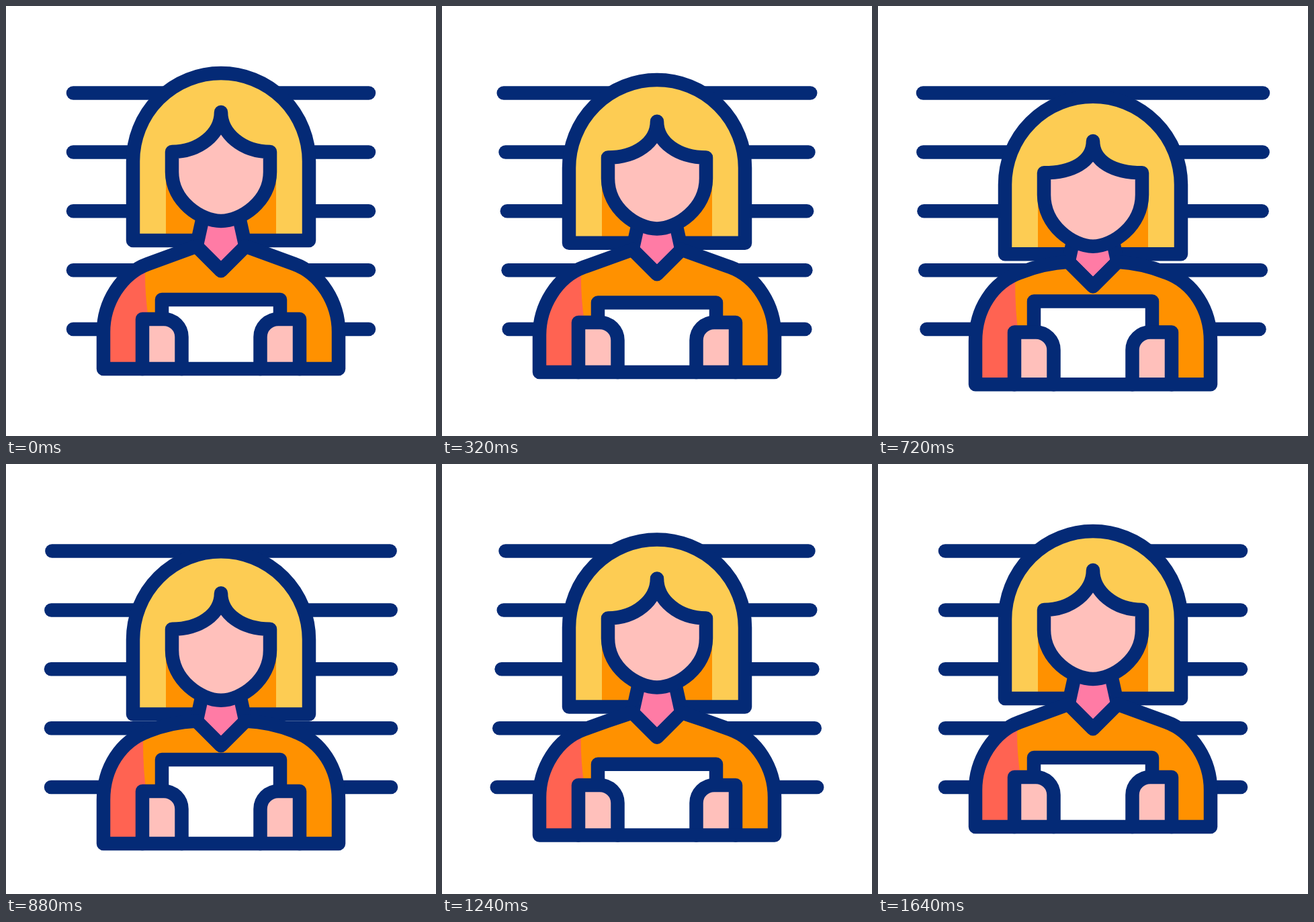
Animation, 640 px wide and 640 px high, one loop 1680 ms. Source, as an HTML page with a canvas:

```html
<!DOCTYPE html>
<html lang="en">
<head>
<meta charset="utf-8">
<title>Line-up</title>
<style>
  html, body { margin: 0; width: 100%; height: 100%; overflow: hidden; background: #fff; }
  canvas { display: block; width: 640px; height: 640px; }
</style>
</head>
<body>
<canvas id="stage"></canvas>
<script>
const LOOP = 1680, STEP = 40;
const NAVY = '#042a76', YELLOW = '#fdcc53', ORANGE = '#ff9100', RED = '#ff6352',
      SKIN = '#ffc0bb', PINK = '#ff7ba5';

const canvas = document.getElementById('stage');
const ctx = canvas.getContext('2d');
const dpr = window.devicePixelRatio || 1;
canvas.width = canvas.height = 640 * dpr;

// Smooth 0..1 ramp between two times
const ease = (t, from, to) => {
  const u = Math.min(1, Math.max(0, (t - from) / (to - from)));
  return (1 - Math.cos(Math.PI * u)) / 2;
};
// Rise, hold, fall
const pulse = (t, a, b, c, d) => ease(t, a, b) - ease(t, c, d);

function shape(d, fill, line = true) {
  const path = new Path2D(d);
  if (fill) { ctx.fillStyle = fill; ctx.fill(path); }
  if (line) ctx.stroke(path);
}

function wall(t) {
  for (let i = 0; i < 5; i++) {
    const grow = 33 * pulse(t - i * 40, 120, 720, 800, 1400);
    shape(`M${100 - grow},${129.5 + i * 87.9}H${540 + grow}`);
  }
}

function hair(nod) {
  const top = 231 + 12 * nod, bottom = 349 - 3.3 * nod;
  const d = `M189,${bottom}V${top}A131,131 0 0 1 451,${top}V${bottom}Z`;
  shape(d, YELLOW, false);
  ctx.fillStyle = ORANGE;
  ctx.fillRect(238, 250, 164, bottom - 250);
  shape(d);
}

function bodyPath(lift) {
  const y = (base, rise) => base - rise * lift;
  return `M145,540V${y(485, 10)}
    C145,${y(442, 15)} 171,${y(398.5, 11)} 211,${y(384, 11)}
    C235,${y(375.2, 11.7)} 259,${y(366.4, 8)} 283.5,357.5
    L320,394L356.5,357.5
    C381,${y(366.4, 8)} 405,${y(375.2, 11.7)} 429,${y(384, 11)}
    C469,${y(398.5, 11)} 495,${y(442, 15)} 495,${y(485, 10)}V540Z`;
}

function torso(lift) {
  const body = bodyPath(lift);
  shape(body, ORANGE, false);

  ctx.save();
  ctx.clip(new Path2D(body));
  const edge = 207 - 3 * lift;
  shape(`M130,350H${edge}V${399 - 11 * lift}Q${edge},430 ${edge + 5},466V540H130Z`, RED, false);
  ctx.restore();

  const paper = 437 - 22 * lift, hand = 466 - 4 * lift;
  ctx.fillStyle = '#fff';
  ctx.fillRect(232, paper, 176, 540 - paper);
  shape(`M232,${hand}V${paper}H408V${hand}`);

  for (const side of [1, -1]) {
    ctx.save();
    ctx.translate(320, 0);
    ctx.scale(side, 1);
    shape(`M-117,540V${hand}H-85A26.5,26.5 0 0 1 -58.5,${hand + 26.5}V540`, SKIN);
    ctx.restore();
  }

  shape('M294,310L283.5,357.5L320,394L356.5,357.5L346,310', PINK);
  shape(body);
}

function face(nod) {
  const part = 158 + 20.5 * nod, bend = 190 + 20 * nod, brow = 217 + 8.3 * nod,
        cheek = 247 + 11 * nod, jaw = 291 + 13 * nod, chin = 320 + 15 * nod;
  shape(`M320,${part}C320,${bend} 288,${brow} 247,${brow}V${cheek}
    C247,${jaw} 290,${chin} 320,${chin}
    C350,${chin} 393,${jaw} 393,${cheek}V${brow}
    C352,${brow} 320,${bend} 320,${part}Z`, SKIN);
}

function draw(t) {
  const sink = 25 * pulse(t, 100, 842, 878, 1600);
  const nod = 1.04 * pulse(t, 100, 600, 640, 1080);
  const lift = pulse(t, 260, 800, 898, 1343);

  ctx.setTransform(dpr, 0, 0, dpr, 0, 0);
  ctx.fillStyle = '#fff';
  ctx.fillRect(0, 0, 640, 640);
  ctx.strokeStyle = NAVY;
  ctx.lineWidth = 20.5;
  ctx.lineCap = ctx.lineJoin = 'round';

  wall(t);
  ctx.translate(0, sink);
  hair(nod);
  torso(lift);
  face(nod);
}

const start = performance.now();
function tick() {
  const t = (performance.now() - start) % LOOP;
  draw(Math.floor(t / STEP) * STEP);
  requestAnimationFrame(tick);
}
tick();
</script>
</body>
</html>
```
